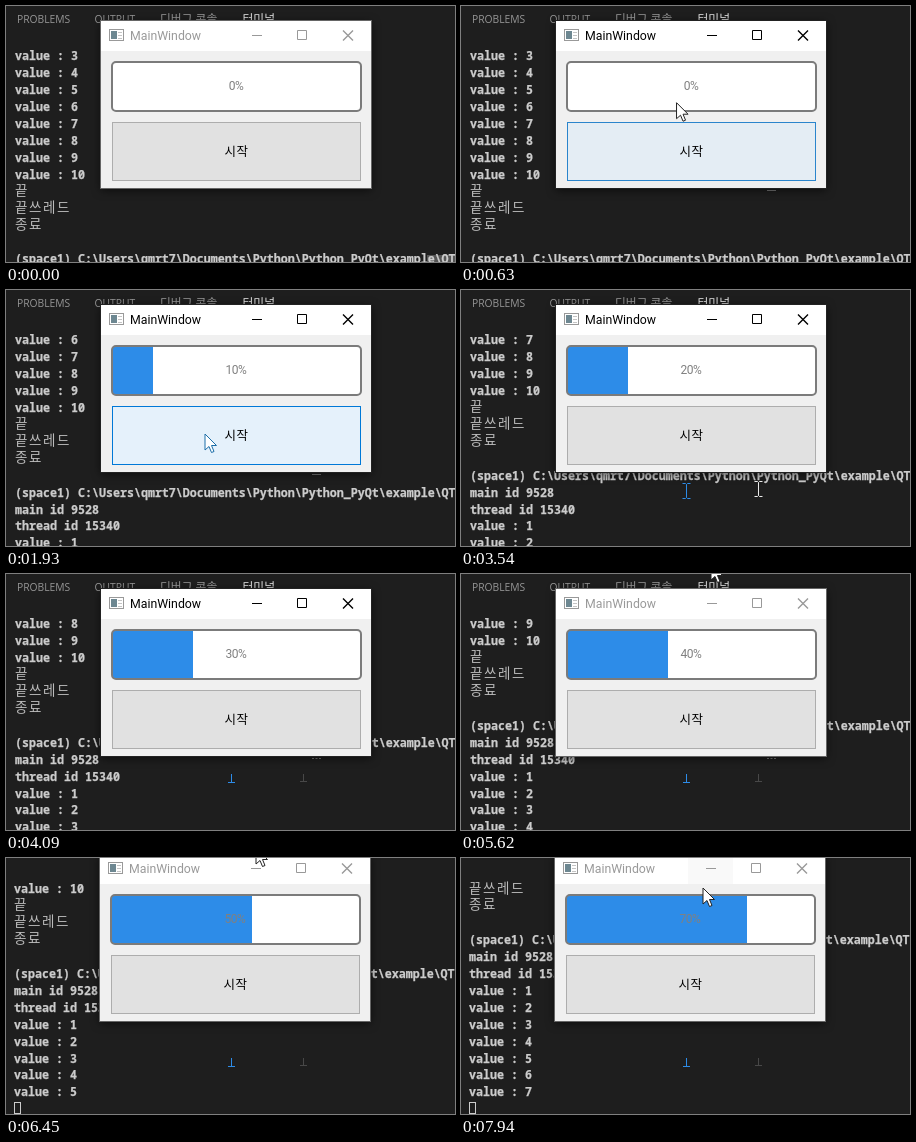
These frames come from a looping animation (449x256 px, 8000 ms). An HTML page:

```html
<!DOCTYPE html>
<html lang="ko">
<head>
<meta charset="utf-8">
<title>Progress thread demo</title>
<style>
html, body { margin: 0; width: 100%; height: 100%; overflow: hidden; background: #1e1e1e; }
svg { display: block; width: 100vw; height: 100vh; }
text { white-space: pre; }
.mono { font: 600 11.667px "Noto Sans Mono", "DejaVu Sans Mono", monospace; fill: #ccc; stroke: #ccc; stroke-width: .25px; }
.ko { font: 300 13.5px "Noto Sans CJK KR", "Noto Sans CJK", sans-serif; letter-spacing: 1.6px; fill: #bbb; }
.tab { font: 10.3px "Open Sans", "Noto Sans CJK KR", sans-serif; fill: #969696; }
.tab.ko-tab { font-size: 11.8px; }
.tab.on { fill: #e7e7e7; }
.title { font: 12.3px Roboto, sans-serif; }
.pct { font: 12px Roboto, sans-serif; letter-spacing: -.5px; fill: #808080; text-anchor: middle; }
.btn { font: 300 12.5px "Noto Sans CJK KR", "Noto Sans CJK", sans-serif; letter-spacing: .5px; text-anchor: middle; }
.shadow { filter: drop-shadow(0 2px 5px rgba(0, 0, 0, .65)); }
.line { fill: none; }
</style>
</head>
<body>
<svg viewBox="0 0 449 256" preserveAspectRatio="none">
  <rect width="449" height="256" fill="#1e1e1e"/>
  <g id="camera">
    <text class="tab" x="11" y="17">PROBLEMS</text>
    <text class="tab" x="88.5" y="17">OUTPUT</text>
    <text class="tab ko-tab" x="154" y="17">디버그 콘솔</text>
    <text class="tab ko-tab on" x="236.5" y="17">터미널</text>
    <rect id="tag" x="421" y="249" width="28" height="8" fill="#555"/>
    <g id="term"></g>
    <rect class="line" x="9.5" y="263.5" width="6" height="11" stroke="#ccc"/>
  </g>
  <g class="line">
    <path id="dash" d="M306 184.5h9" stroke="#777"/>
    <path id="dots" d="M306 184.5h9" stroke="#777" stroke-dasharray="2 1.5"/>
    <g id="feet">
      <path d="M225.5 200v8M222 208.5h7" stroke="#2d8ce8"/>
      <path d="M297.5 200v7M294 207.5h7" stroke="#484848"/>
    </g>
  </g>
  <g id="win">
    <rect class="shadow" x="95" y="15" width="270" height="167" fill="#f0f0f0"/>
    <rect id="edge" class="line" x="94.5" y="14.5" width="271" height="168"/>
    <rect x="95" y="15" width="270" height="30" fill="#fff"/>
    <rect id="minHover" x="228" y="15" width="45" height="30" fill="#e5e5e5"/>
    <rect x="103.5" y="23.5" width="14" height="11" fill="#fff" stroke="#999"/>
    <rect x="105" y="25" width="6" height="8" fill="#6d8791"/>
    <path d="M112 26.5h4M112 29.5h4M112 32.5h4" stroke="#c4c4c4"/>
    <text id="title" class="title" x="124" y="34">MainWindow</text>
    <g id="controls" class="line">
      <path d="M246 29.5h10M291.5 24.5h9v9h-9z"/>
      <path d="M337 24.5l10 10M347 24.5l-10 10" stroke-width="1.4"/>
    </g>
    <rect x="106" y="56" width="249" height="49" rx="4" fill="#fff"/>
    <rect id="bar" x="107" y="57" height="47" fill="#2d8ce8"/>
    <rect class="line" x="106" y="56" width="249" height="49" rx="4" stroke="#7b7b7b" stroke-width="2"/>
    <text id="pct" class="pct" x="230" y="83.5"></text>
    <g id="button">
      <rect fill="#e1e1e1" stroke="#adadad"/>
      <rect id="hover" fill="#e5f1fb" stroke="#0078d7"/>
      <rect id="press" fill="#cce4f7" stroke="#005499"/>
    </g>
    <text class="btn" x="230.5" y="150">시작</text>
  </g>
  <path id="ghost" class="line" stroke="#2d8ce8" transform="translate(225.5 201)"/>
  <path id="beam" class="line"/>
  <path id="arrow" d="M0 0V16L4 12.5L6.5 18.5L9 17.5L6.5 11.5H11.5Z" fill="#fff"/>
</svg>
<script>
const LOOP = 8000, ROW = 16.95, FIRST_TICK = 1650, TICK = 1012;
const $ = id => document.getElementById(id);
const set = (el, attrs) => { for (const k in attrs) el.setAttribute(k, attrs[k]); };
const show = (id, opacity) => set($(id), { opacity: +opacity });
const values = (from, to) => Array.from({ length: to - from + 1 }, (_, i) => `value : ${from + i}`);

// Smooth step from 0 to 1 between times a and b.
const ease = (t, a, b) => {
  const f = Math.min(1, Math.max(0, (t - a) / (b - a)));
  return f * f * (3 - 2 * f);
};
const pulse = (t, on, off, fade = 200) => ease(t, on, on + fade) - ease(t, off, off + fade);

const lines = [
  ...values(3, 10), '끝', '끝쓰레드', '종료', '',
  '(space1) C:\\Users\\qmrt7\\Documents\\Python\\Python_PyQt\\example\\QT',
  'main id 9528', 'thread id 15340', ...values(1, 7)
];

const rows = Array.from({ length: 13 }, (_, i) => {
  const el = document.createElementNS('http://www.w3.org/2000/svg', 'text');
  $('term').append(el);
  return { el, y: 54 + i * ROW };
});

for (const r of $('button').children) set(r, { x: 106.5, y: 116.5, width: 248, height: 58 });
const beamPath = 'M-4 -7.5h3l1 1 1 -1h3M0 -6.5V6.5M-4 7.5h3l1 -1 1 1h3';
for (const id of ['ghost', 'beam']) set($(id), { d: beamPath });

// Each glide starts where the one before it ended.
const glides = [
  { from: 70, to: 700, x: 209, y: 91 },
  { from: 900, to: 1380, x: 199, y: 144 },
  { from: 2520, to: 3010, x: 225.5, y: 201 },
  { from: 3470, to: 3540, x: 297.5, y: 199 },
  { from: 3540, to: 4090, x: 255, y: -25 },
  { from: 5560, to: 5620, x: 250, y: -10 },
  { from: 6720, to: 6850, x: 250, y: -25 },
  { from: 7660, to: 7940, x: 242, y: 30 }
];

function mouseAt(t) {
  let x = 405, y = 262;
  for (const g of glides) {
    const f = ease(t, g.from, g.to);
    x += (g.x - x) * f;
    y += (g.y - y) * f;
  }
  return [x, y];
}

function drawTerminal(n) {
  const top = n ? n + 2 : 0;
  rows.forEach(({ el, y }, i) => {
    const s = lines[top + i], ko = /[가-힣]/.test(s);
    el.textContent = s;
    set(el, { class: ko ? 'ko' : 'mono', x: 9, y: ko ? y - .5 : y });
  });
}

function drawWindow(t, n) {
  const active = t >= 490 && t < 5620;
  set($('title'), { fill: active ? '#000' : '#999' });
  set($('controls'), { stroke: active ? '#000' : '#999' });
  set($('edge'), { stroke: active ? '#222' : '#666' });
  set($('bar'), { width: Math.ceil(n * 24.7 / 20) * 20 });
  $('pct').textContent = n * 10 + '%';
  show('hover', .8 * pulse(t, 350, 600) + pulse(t, 1080, 2660));
  show('press', pulse(t, 1560, 1700, 100));
  show('minHover', .5 * pulse(t, 7750, 7860, 100) + .2 * ease(t, 7860, 7940));
}

function drawMouse(t) {
  const [x, y] = mouseAt(t);
  const overWin = x >= 95 && x <= 365 && y >= 15 && y <= 182;
  const isBeam = !overWin && y > 42;
  const at = { transform: `translate(${x} ${y})` };
  set($('beam'), { ...at, stroke: t > 2520 && t < 3480 ? '#2d8ce8' : '#eee' });
  set($('arrow'), { ...at, stroke: t > 1000 && t < 2700 ? '#1c6ea8' : '#222' });
  show('beam', isBeam && t >= 70);
  show('arrow', !isBeam);
}

function draw(t) {
  const n = Math.max(0, 1 + Math.floor((t - FIRST_TICK) / TICK));
  drawTerminal(n);
  drawWindow(t, n);
  drawMouse(t);

  const move = t < 6380 ? '0 0' : t < 6450 ? '-1 -12' : '-1 -19';
  for (const id of ['camera', 'win']) set($(id), { transform: `translate(${move})` });

  show('tag', t < 280);
  show('dash', t >= 370 && n < 2);
  show('dots', n > 2 && t < 6380);
  show('feet', n > 2);
  show('ghost', t >= 3480 && n < 3);
}

const start = performance.now();
function frame() {
  draw((performance.now() - start) % LOOP);
  requestAnimationFrame(frame);
}
draw(0);
requestAnimationFrame(frame);
</script>
</body>
</html>
```
